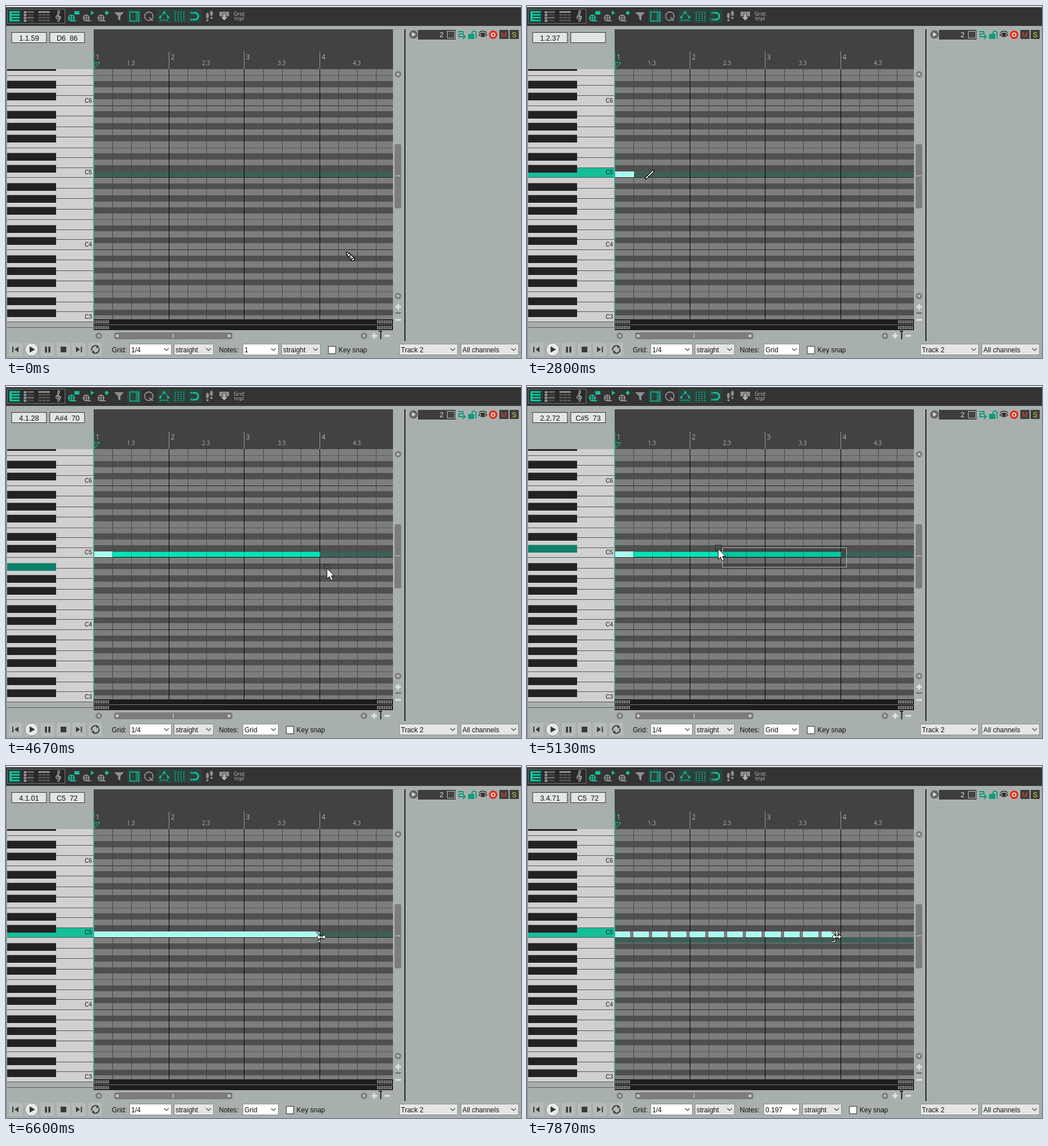
Animation, 905 px wide and 619 px high, one loop 8000 ms. Source, as an HTML page:

```html
<!DOCTYPE html>
<html>
<head>
<meta charset="utf-8">
<title>Piano roll</title>
<style>
html, body { margin: 0; width: 100%; height: 100%; overflow: hidden; background: #a8b0ae; }
svg { display: block; width: 905px; height: 619px; }
text { font-family: "Liberation Sans", Arial, sans-serif; font-size: 12px; fill: #111; white-space: pre; }
text.o { font-family: "Open Sans", sans-serif; }
</style>
</head>
<body>
<svg id="stage" viewBox="0 0 905 619" xmlns="http://www.w3.org/2000/svg"></svg>
<script>
const LEFT = 154.5, BEAT = 33.09, BASE = 301.8, ROW = 10.56, NOTES = 12, LOOP = 8000;
const TEAL = '#18bd98', GREY = '#8f8f8f';
const NAMES = ['C', 'C#', 'D', 'D#', 'E', 'F', 'F#', 'G', 'G#', 'A', 'A#', 'B'];
const WHITE_Y = { 0: 0, 2: 17.6, 4: 35.2, 5: 52.8, 7: 71.3, 9: 89.8, 11: 108.3, 12: 126.72 };
const isBlack = p => NAMES[p % 12].length > 1;
const rowTop = p => Math.floor(BASE - (p - 71) * ROW);
const gridX = b => Math.round(154 + b * 33.06);

const rect = (x, y, w, h, fill, more = '') => `<rect x="${x}" y="${y}" width="${w}" height="${h}" fill="${fill}" ${more}/>`;
const path = (d, fill = 'none', stroke = 'none', w = 1, more = '') =>
  `<path d="${d}" fill="${fill}" stroke="${stroke}" stroke-width="${w}" ${more}/>`;
const circle = (x, y, r, fill, more = '') => `<circle cx="${x}" cy="${y}" r="${r}" fill="${fill}" ${more}/>`;
const text = (x, y, s, more = '') => `<text x="${x}" y="${y}" ${more}>${s}</text>`;
const group = (id, body) => `<g id="${id}">${body}</g>`;
const range = (n, f) => Array.from({ length: n }, (_, i) => f(i)).join('');

function whiteKey(p) {
  const c = p % 12, bottom = BASE - (Math.floor(p / 12) - 6) * 126.72;
  const y = Math.floor(bottom - (WHITE_Y[c + 1] ?? WHITE_Y[c + 2]));
  return { y, h: Math.floor(bottom - WHITE_Y[c]) - y };
}

function toolbar() {
  const reel = (x, c = GREY) => circle(x, 21, 6, c) +
    [[-2, -2], [2, -2], [-2, 2], [2, 2]].map(([a, b]) => circle(x + a, 21 + b, 1.4, '#333')).join('') + rect(x + 2, 25, 6, 2, c);
  const lit = x => rect(x, 5, 25, 25, '#2a443e', 'rx="2"');
  const small = 'class="o" style="font-size:9px;fill:#c4c4c4"';
  return rect(0, 0, 905, 35, '#333') + rect(0, 0, 905, 2, '#e9eceb') +
    rect(2.5, 5.5, 101, 25, '#292929', 'stroke="#777"') + rect(3, 6, 25, 24, '#203d36') +
    range(4, i => rect(6, 9 + i * 5, 18, 3, TEAL)) + rect(6, 9, 4, 18, TEAL) +
    range(4, i => rect(31, 9 + i * 5, 5, 4, GREY) + rect(37, 9 + i * 5, 12, 3, i % 2 ? '#444' : '#666')) +
    rect(57, 9, 20, 3, GREY) + range(9, i => rect(57 + i % 3 * 7, 14 + Math.floor(i / 3) * 5, 6, 3, '#555')) +
    path('M90 26Q93 28 94 25L91 11Q92 6 94 9Q95 13 90 16Q85 21 91 23Q97 23 96 19Q92 16 90 20', 'none', '#b0b0b0', 1.4) +
    reel(115, TEAL) + rect(120, 9, 9, 6, TEAL) +
    reel(141) + path('M149 8L155 12L149 16Z', TEAL) + reel(167) + path('M177 8L181 12L177 16L173 12Z', TEAL) +
    path('M190 11H207L201 18V26L197 23V18Z', GREY) +
    lit(213) + rect(217.5, 10.5, 16, 16, 'none', `stroke="${TEAL}" stroke-width="1.5"`) + path('M229 11V26M231.5 13V25', 'none', TEAL, 1.5, 'stroke-dasharray="2 1"') +
    circle(251, 18, 7.5, 'none', `stroke="${GREY}" stroke-width="1.8"`) + path('M252 20L258 26', 'none', GREY, 2) +
    lit(266) + path('M271 19L278 11L285 19M270 25H286', 'none', TEAL, 1.6, 'stroke-dasharray="4 1.5"') + [[271, 20], [278, 11], [285, 20]].map(([x, y]) => circle(x, y, 2, TEAL)).join('') +
    lit(292) + range(4, i => path(`M${297.5 + i * 5} 10V27`, 'none', TEAL, 1.5, 'stroke-dasharray="2 1.6"')) +
    lit(319) + path('M324 12H332A6 6 0 0 1 332 24H324', 'none', TEAL, 3) + path('M327 9V27', 'none', '#2a443e') +
    `<g fill="${GREY}"><ellipse cx="354" cy="17" rx="2.6" ry="5"/><ellipse cx="361" cy="13" rx="2.6" ry="4.6"/><circle cx="354" cy="25" r="2"/><circle cx="361" cy="21" r="2"/></g>` +
    rect(375, 10, 17, 8, GREY) + path('M381 13H386V19H390L383.5 26L377 19H381Z', '#b0b0b0', '#333', .8) +
    text(400, 17, 'Grid:', small) + text(401, 25, 'tripl', small);
}

function keyboard() {
  let whites = '', lines = '', blacks = '', labels = '';
  for (let p = 47; p <= 90; p++) {
    if (isBlack(p)) {
      blacks += rect(2, rowTop(p) - .5, 86, 13.5, '#222', `id="b${p}"`);
    } else {
      const k = whiteKey(p);
      whites += rect(2, k.y, 151, k.h, '#d0d0d0', `id="w${p}"`);
      lines += rect(2, k.y, 151, 1, '#555');
      if (p % 12 === 0) labels += text(151, k.y + k.h - 5, 'C' + (p / 12 - 1), 'text-anchor="end" style="font-size:10px"');
    }
  }
  return `<g clip-path="url(#keys)">${whites}${lines}${blacks}${labels}</g>` + rect(2, 555, 151, 1, '#555') + rect(2, 565, 151, 1, '#555');
}

function roll() {
  let s = rect(154, 111, 526, 440, '#7d7d7d');
  for (let p = 48; p <= 90; p++) {
    const y = rowTop(p), end = rowTop(p - 1);
    if (isBlack(p)) s += rect(154, y, 526, end - y, '#4f4f4f');
    if (p % 12 === 0 || p % 12 === 5) s += rect(154, end, 526, 1, p % 12 ? '#595959' : '#2a2a2a');
  }
  s += rect(154, 0, 526, 10, '#3d5f57', 'id="tint"');
  s += range(16, i => rect(gridX(i), 111, 1, 440, i % 4 ? '#454545' : '#000'));
  return `<g clip-path="url(#roll)">${s}</g>`;
}

function ruler() {
  const st = n => `class="o" style="font-size:${n}px;fill:#aeb2b1"`;
  return rect(154, 41, 526, 70, '#424242') + range(4, i =>
    rect(gridX(i * 4), 80, 1, 31, '#9a9a9a') + text(gridX(i * 4) + 3.5, 94, i + 1, st(12)) +
    text(gridX(i * 4 + 2) - .5, 104, i + 1 + '.3', st(10) + ' text-anchor="middle"')) +
    path('M155 99.5H165L155 110Z', '#35514a', TEAL);
}

function scrollbars() {
  const knob = (x, y, d) => circle(x, y, 5.8, '#7c7f7e') + path(d, '#d8d8d8');
  return knob(689, 120, 'M686 121.5L689 117.5L692 121.5Z') + knob(689, 510, 'M686 508.5L689 512.5L692 508.5Z') +
    rect(683, 243, 11.5, 113, '#7c7c7c', 'rx="3"') + rect(684, 298, 9, 1.2, '#c8c8c8') +
    path('M684 529H694M689 524V534M684 552H694', 'none', '#dfe3e2', 3) + rect(684, 539, 10, 2, '#666') +
    knob(163, 580, 'M164.5 577L160.5 580L164.5 583Z') + knob(629, 580, 'M627.5 577L631.5 580L627.5 583Z') +
    rect(190, 574, 208, 12, '#7c7c7c', 'rx="4"') + circle(195.5, 580, 2.5, '#d0d0d0') + circle(392, 580, 2.5, '#d0d0d0') + rect(293, 576, 1.4, 8, '#d0d0d0') +
    path('M642 580H652M647 575V585M665 580H675', 'none', '#dfe3e2', 3) + path('M655 572H661M658.5 572V586', 'none', '#222', 2);
}

function lanes() {
  const dots = (x, y) => range(3, i => path(`M${x} ${y + i * 2}H${x + 27}`, 'none', '#f0f0f0', 1, 'stroke-dasharray="2 1"'));
  return rect(154, 551, 526, 19, '#1c1c1c') + rect(154, 560, 526, 1, '#777') + [155, 652].map(x => dots(x, 553.5) + dots(x, 563.5)).join('');
}

function trackPanel() {
  const btn = (x, c, s) => rect(x, 42, 16, 16, '#3d3d3d', 'rx="1"') + text(x + 8, 55, s, `text-anchor="middle" style="font-size:12px;fill:${c}"`);
  return rect(700, 41, 2, 548, '#222') + circle(716, 50, 7.5, '#666') + path('M713.5 46L720 50L713.5 54Z', '#ddd') +
    rect(724, 42, 66, 17, '#3d3d3d') + text(769, 55, '2', 'text-anchor="end" style="font-size:13px;fill:#ddd"') +
    rect(775.5, 44.5, 13, 12, '#454545', 'stroke="#bbb"') +
    path('M794 45H803V49H796V54H807M803 50L807 54L803 58', 'none', '#12997b', 2) +
    rect(812, 49, 11, 9, '#12997b') + path('M819 50V46Q822 42 826 46V57', 'none', '#12997b', 2) +
    path('M831 51Q838 44 845 51Q838 57 831 51Z', '#c4c8c7', '#333', 1.4) + circle(838, 50.5, 3.4, '#333') + path('M831 47Q838 41 845 47', 'none', '#333', 1.6) +
    circle(856, 50.5, 7.5, '#e0301e') + circle(856, 50.5, 3, 'none', 'stroke="#fff" stroke-width="1.5"') +
    btn(867, '#d84a40', 'M') + btn(885, '#e2d440', 'S');
}

const combo = (x, w, s, fill, id = '') => rect(x + .5, 594.5, w - 1, 19, fill, 'stroke="#8a8f8e"') + text(x + 3, 608.5, s, id && `id="${id}"`) +
  path(`M${x + w - 13} 602L${x + w - 9} 606L${x + w - 5} 602`, 'none', '#444', 1.2);

function bottomBar() {
  const pad = [17, 45, 73, 101, 128, 157].map(x => rect(x - 12, 592, 24, 24, '#b4bbb9', 'rx="3"')).join('');
  return pad + path('M11 599h2v10h-2zM22 599V609L15 604Z', '#3a3a3a') + circle(45, 604, 11.5, '#e6e9e8', 'stroke="#777"') + path('M41.5 598.5L51 604L41.5 609.5Z', '#333') +
    path('M68.5 599h3.5v10.5h-3.5zM74.5 599h3.5v10.5h-3.5zM96 599h10v10h-10zM123 599L130 604L123 609ZM131.5 599h2v10h-2z', '#3a3a3a') +
    path('M151 606A6.3 6.3 0 0 1 161 599M163 602A6.3 6.3 0 0 1 153 609', 'none', '#3a3a3a', 2) + path('M159 596L164 600L159 602ZM155 606L150 608L155 612Z', '#3a3a3a') +
    text(186, 608.5, 'Grid:') + combo(217, 74, '1/4', '#fff') + combo(295, 70, 'straight', '#e4e6e5') +
    text(374, 608.5, 'Notes:') + combo(416, 63, '1', '#fff', 'len') +
    group('swing', combo(484, 69, 'straight', '#e4e6e5')) +
    group('snap', rect(.5, 598.5, 13, 13, '#fff', 'stroke="#333"') + text(18.5, 609, 'Key snap')) +
    combo(691, 103, 'Track 2', '#e4e6e5') + combo(799, 102, 'All channels', '#e4e6e5');
}

const readout = (x, id) => rect(x + .5, 46.5, 61, 18, '#e1e5e4', 'stroke="#333"') + text(x + 31, 60.5, '', `id="${id}" text-anchor="middle" style="font-size:12.6px"`);

const BRACKET = 'M-8 -8.5H-3.5Q-2 -8.5 -2 -6V6Q-2 8.5 -3.5 8.5H-8';
const cursors = {
  pencil: path('M.7 .7L2 6.3L10.8 15.5Q12.5 17 14.7 15Q16.5 13 15 11.2L6 2.3Z', '#fff', '#000', 1.3) + path('M2.5 6L6.2 2.7M5 9L9 5M7 8L11 12M10 14.5L14 10.5', 'none', '#000', 1.1),
  brush: path('M.8 -.8L5 -5L14 -14', 'none', '#000', 4, 'stroke-linecap="round"') + path('M1 -1L14 -14', 'none', '#fff', 1.9) + path('M4 -6L7 -3', 'none', '#000'),
  arrow: rect(-5, -6.5, 10, 10, 'none', 'stroke="#000" stroke-dasharray="1.5 1.5"') + path('M0 0V18.5L4.3 14.6L7.3 21.5L10.5 20L7.5 13.3H13Z', '#fff', '#000'),
  resize: path(BRACKET, 'none', '#000', 3.5) + path(BRACKET, 'none', '#fff', 1.5) +
    path('M-7 0L-2 -5V-1.5H4V-5L9 0L4 5V1.5H-2V5Z', '#fff', '#000')
};

const stage = document.getElementById('stage');
stage.innerHTML = '<defs><clipPath id="keys"><rect x="2" y="111" width="151" height="444"/></clipPath>' +
  '<clipPath id="roll"><rect x="154" y="111" width="526" height="440"/></clipPath></defs>' +
  rect(0, 0, 905, 619, '#a8b0ae') + toolbar() + rect(0, 35, 1, 584, '#7d8281') + readout(9.5, 'time') + readout(76.5, 'pitch') +
  keyboard() + ruler() + roll() + lanes() + scrollbars() + trackPanel() + bottomBar() +
  range(NOTES, i => rect(gridX(i) + .5, 291.5, 0, 9, '', `id="n${i}"`)) +
  rect(153.5, 80, 1.5, 471, '#2aa58b') +
  rect(0, 0, 0, 0, '#000', 'id="box" fill-opacity=".12" stroke="#b4b4b4"') +
  Object.keys(cursors).map(k => group(k, cursors[k])).join('');
const $ = id => document.getElementById(id);
const set = (id, o) => { for (const k in o) $(id).setAttribute(k, o[k]); };
const show = (id, on) => { $(id).style.display = on ? '' : 'none'; };

// pointer path: time, x, y
const track = [
  [0, 597, 432], [467, 262, 383], [667, 262, 383], [1200, 176, 277], [1350, 157, 286], [1467, 162, 295], [1600, 162, 295],
  [1667, 162.5, 296.5], [1800, 162.5, 296.5], [2467, 198, 297], [2667, 198, 297], [2800, 200, 298], [3200, 200, 298],
  [3933, 408.3, 297], [4067, 476, 297], [4267, 540, 297], [4400, 545, 299], [4667, 561, 318], [4800, 561, 318],
  [4867, 553, 318], [4933, 520, 316], [5133, 344.1, 284.3], [5333, 235, 279], [5600, 166, 276], [5667, 165.2, 276], [5800, 165, 276],
  [6333, 594, 292], [6467, 598, 296], [6600, 551.98, 300], [6667, 551.98, 300], [6800, 553, 300], [6933, 553, 300],
  [7133, 551.5, 304], [7467, 545, 308], [7600, 545, 308], [7867, 542.15, 299.5], [8100, 542.15, 299.5]
];
function pointer(t) {
  const i = Math.max(1, track.findIndex(k => k[0] >= t)), a = track[i - 1], b = track[i];
  const u = Math.min(1, (t - a[0]) / (b[0] - a[0]));
  return [a[1] + (b[1] - a[1]) * u, a[2] + (b[2] - a[2]) * u];
}

let lastKey = 0;
function highlight(p) {
  const paint = (k, white, black) => k && set((isBlack(k) ? 'b' : 'w') + k, { fill: isBlack(k) ? black : white });
  paint(lastKey, '#d0d0d0', '#222');
  paint(p, '#14bf99', '#10806a');
  lastKey = p;
}

function render(ms) {
  const t = Math.floor((ms + 3.5) * 15 / 1000) * 1000 / 15;
  const [x, y] = pointer(t);
  const drawn = t > 1860, freed = t > 4390, chosen = t > 5860, done = t > 7660;
  const p = 72 + Math.floor((BASE - y) / ROW);
  const beats = Math.max(0, (x - LEFT) / BEAT), whole = Math.floor(beats);

  $('time').textContent = drawn ? `${Math.floor(whole / 4) + 1}.${whole % 4 + 1}.${String(Math.floor((beats - whole) * 100)).padStart(2, '0')}` : '1.1.59';
  const blank = t > 2790 && !freed;
  $('pitch').textContent = !drawn ? 'D6  86' : blank ? '' : `${NAMES[p % 12]}${Math.floor(p / 12) - 1}  ${p}`;
  highlight(drawn ? p : 0);
  set('tint', { y: rowTop(done ? 71 : 72) });

  const count = !drawn ? 0 : t < 3260 ? 1 : freed ? NOTES : Math.min(NOTES, whole + 1);
  const cut = t > 6990 ? Math.min(7, Math.max(0, 551.98 - x)) : 0;
  for (let i = 0; i < NOTES; i++) {
    const sel = !i || chosen;
    show('n' + i, i < count);
    set('n' + i, { width: gridX(i + 1) - gridX(i) - cut, fill: sel ? '#a6fff0' : '#00e5b8', stroke: sel ? '#d6fff8' : '#00917a' });
  }

  const boxed = t > 4810 && !chosen;
  show('box', boxed);
  if (boxed) {
    const bx = Math.floor(x) + .5, by = Math.floor(y) + .5;
    set('box', { x: bx, y: by, width: Math.max(0, 561.5 - bx), height: Math.max(0, 318.5 - by) });
  }

  const kind = t < 2790 ? 'pencil' : !freed ? 'brush' : t < 4530 ? 'pencil' : t < 5900 ? 'arrow' : t < 6560 ? 'pencil' : 'resize';
  const off = { pencil: [0, 0], brush: [8, 6], arrow: [3, 2.5], resize: [1.2, .8] }[kind];
  const at = kind === 'arrow' ? pointer(t + 20) : [x, y];
  for (const k in cursors) show(k, k === kind);
  set(kind, { transform: `translate(${at[0] + off[0]} ${at[1] + off[1]})` });

  const grid = drawn && !done;
  $('len').textContent = !drawn ? '1' : done ? '0.197' : 'Grid';
  show('swing', !grid);
  set('snap', { transform: `translate(${grid ? 492 : 566} 0)` });
}

const start = performance.now();
function tick() {
  render((performance.now() - start) % LOOP);
  requestAnimationFrame(tick);
}
tick();
</script>
</body>
</html>
```
